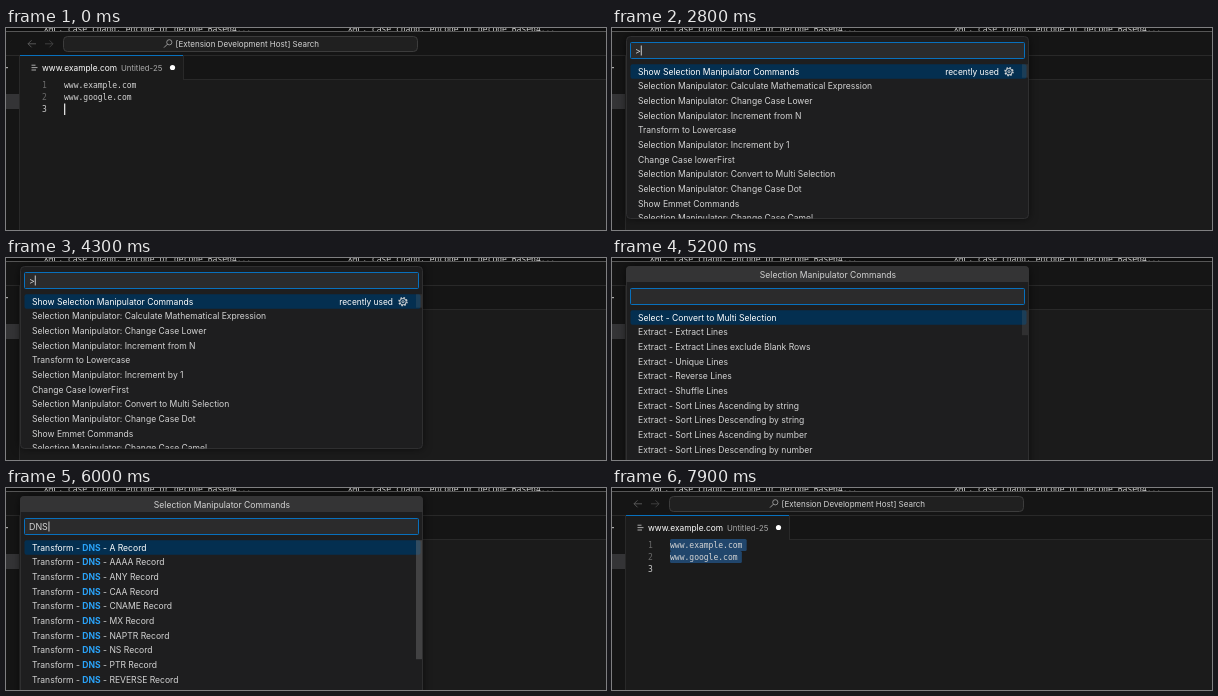
Write an HTML page that moves like this. It is 600x202 px and loops after 8000 ms.

```html
<!DOCTYPE html>
<html lang="en">
<head>
<meta charset="utf-8">
<title>Command palette</title>
<style>
  html, body { margin: 0; width: 600px; height: 202px; overflow: hidden; background: #1b1b1b; }
  svg { display: block; }
  text { font: 8.57px Inter, "Liberation Sans", sans-serif; fill: #d4d4d4; white-space: pre; }
  .mono { font: 8.02px "DejaVu Sans Mono", monospace; }
  .match { fill: #2aa3f8; font-weight: 700; }
</style>
</head>
<body>
<svg id="stage" width="600" height="202" viewBox="0 0 600 202"></svg>
<script>
const LOOP = 8000, ROW = 14.67;
const OPEN = 2800, MENU = 4400, CLOSE = 7200;

const doc = ['www.example.com', 'www.google.com', ''];
const sm = 'Selection Manipulator: ';
const recent = [
  'Show Selection Manipulator Commands', sm + 'Calculate Mathematical Expression',
  sm + 'Change Case Lower', sm + 'Increment from N', 'Transform to Lowercase',
  sm + 'Increment by 1', 'Change Case lowerFirst', sm + 'Convert to Multi Selection',
  sm + 'Change Case Dot', 'Show Emmet Commands', sm + 'Change Case Camel'
];
const commands = [
  'Select - Convert to Multi Selection',
  ...['Extract Lines', 'Extract Lines exclude Blank Rows', 'Unique Lines', 'Reverse Lines',
    'Shuffle Lines', 'Sort Lines Ascending by string', 'Sort Lines Descending by string',
    'Sort Lines Ascending by number', 'Sort Lines Descending by number',
    'Sort Lines Ascending by length'].map(s => 'Extract - ' + s),
  ...'A AAAA ANY CAA CNAME MX NAPTR NS PTR REVERSE SOA'.split(' ')
    .map(s => `Transform - DNS - ${s} Record`)
];

const rect = (x, y, w, h, fill, extra = '') =>
  `<rect x="${x}" y="${y}" width="${w}" height="${h}" fill="${fill}" ${extra}/>`;
const text = (x, y, s, style = '', cls = '') =>
  `<text x="${x}" y="${y}" style="${style}" class="${cls}">${s}</text>`;
const line = (d, color, width = 1) =>
  `<path d="${d}" fill="none" stroke="${color}" stroke-width="${width}"/>`;

// Caret shows for the first half of each second after it was last moved
const blink = (t, since) => (t - since) % 1000 < 500;

function editor(t) {
  // Up twice, then extend the selection down twice
  const selected = t < 2200 ? 0 : t < 2300 ? 1 : 2;
  const active = t < 2000 ? 2 : t < 2100 ? 1 : t < 2200 ? 0 : selected;
  const caret = t < 2000 ? t < 200 || t >= 700 && blink(t, 700)
    : t < OPEN ? true : t >= CLOSE && blink(t, CLOSE);
  const banner = 'XML, case chang, encode or decode Base64...';
  let s = rect(0, 0, 600, 4, '#0c0c0c')
    + text(37.7, 4.2, banner, '', 'mono') + text(341.7, 4.2, banner, '', 'mono')
    + rect(0, 4, 600, 198, '#151515') + rect(0, 3, 600, 1, '#555')
    + rect(0, 27, 600, 1, '#292929')
    + rect(14, 52, 586, 150, '#1b1b1b') + rect(14, 51, 586, 1, '#292929')
    + rect(14, 27, 163, 25, '#1b1b1b') + rect(14, 27, 163, 1, '#0870bd')
    + rect(13, 28, 1, 174, '#292929') + rect(177, 28, 1, 24, '#292929')
    + rect(0, 66, 13, 15, '#343436') + rect(0, 39, 2, 1.2, '#aaa')
    // Title bar
    + line('M30 15.8H22m3.5-3.5L22 15.8l3.5 3.5', '#656565', .8)
    + line('M39 15.8h8m-3.5-3.5l3.5 3.5l-3.5 3.5', '#484848', .8)
    + rect(57.5, 8.5, 354, 15, '#202020', 'rx="4" stroke="#3c3c3c"')
    + '<circle cx="163.3" cy="14.3" r="2.6" fill="none" stroke="#aaa" stroke-width=".8"/>'
    + line('M161.4 16.2L158 19.6', '#aaa', .9)
    + text(169.5, 18.7, '[Extension Development Host] Search', 'font-size:8px')
    // Tab
    + line('M25.5 37.2h4m-4 2.4h6m-6 2.4h4.5', '#b8b8b8', .9)
    + text(36, 42.6, doc[0], 'font-size:8.35px;fill:#fff')
    + text(115, 42.6, 'Untitled-25', 'font-size:7.8px;fill:#aaa')
    + '<circle cx="166.5" cy="39.5" r="2.6" fill="#fff"/>';
  doc.forEach((str, i) => {
    const y = 51 + 12 * i;
    if (i < selected) s += rect(58, y, (str.length + 1) * 4.83 - .6, 12, '#21466c', 'rx="1.5"');
    s += text(36, y + 8.9, i + 1, `fill:${i === active ? '#ccc' : '#6a6a6a'}`, 'mono')
      + text(58, y + 8.9, str, '', 'mono');
  });
  return caret ? s + rect(58, 51.5 + 12 * active, 1.3, 11.5, '#ddd') : s;
}

function palette(t) {
  const menu = t >= MENU, top = menu ? 30 : 14;
  const query = t < 5800 || !menu ? '' : 'DNS'.slice(0, Math.floor((t - 5700) / 100));
  const typed = menu ? query : '&gt;';
  const rows = menu ? commands.filter(c => c.toUpperCase().includes(query)) : recent;
  const since = query ? Math.min(6000, Math.floor(t / 100) * 100) : menu ? MENU : OPEN;
  const caretX = menu ? [23.5, 29.8, 36.5, 42.5][query.length] : 28.8;
  const caretOn = menu ? blink(t, since) : blink(t, OPEN) || t >= 4300;
  const first = top + 22.2;
  let s = rect(14.5, 8.5, 402, menu ? 210 : 182, '#1e1e1f',
      'rx="4" stroke="#2f2f30" style="filter:drop-shadow(0 0 4px #0008)"');
  if (menu) {
    s += line('M14 24V12q0-4 4-4h395q4 0 4 4v12z', 'none').replace('fill="none"', 'fill="#343435"')
      + text(216, 20.2, 'Selection Manipulator Commands', 'text-anchor:middle');
  }
  s += rect(18.5, top + .5, 394, 16, '#2b2b2c', 'rx="1" stroke="#0870bd"')
    + text(23, top + 11.7, typed, 'font-size:8.9px')
    + rect(18.5, first, 396, ROW, '#042f50', 'rx="2"');
  if (caretOn) s += rect(caretX, top + 3.5, .9, 10, '#ddd');

  s += '<g clip-path="url(#inside)">';
  rows.slice(0, 11).forEach((row, i) => {
    const label = query
      ? row.replace(new RegExp(query, 'i'), '<tspan class="match">$&</tspan>') : row;
    s += text(26, first + 10.5 + i * ROW, label, i ? '' : 'fill:#fff');
  });
  s += '</g>';

  // The scrollbar is faint until the list is filtered
  const bar = !menu ? 13.5 : query.length > 1 ? 119 : query ? 70 : 25;
  s += rect(410, first, 6, bar, '#797979', `opacity="${query ? .4 : .2}"`);
  if (!menu) {
    s += text(387, first + 10.5, 'recently used', 'fill:#fff;font-size:8.4px;text-anchor:end')
      + '<g fill="none" stroke="#ddd"><circle cx="397" cy="43.7" r="3.2" stroke-width=".9"/>'
      + '<circle cx="397" cy="43.7" r="4" stroke-width="1.3" stroke-dasharray="1.57 1.57"/>'
      + '<circle cx="397" cy="43.7" r="1.1" stroke-width=".8"/></g>';
  }
  return `<clipPath id="inside">${rect(15, 9, 401, menu ? 193 : 181.5, '#000')}</clipPath>` + s;
}

const stage = document.getElementById('stage');
let shown = '';

function draw() {
  const t = performance.now() % LOOP;
  const picture = editor(t) + (t >= OPEN && t < CLOSE ? palette(t) : '');
  if (picture !== shown) stage.innerHTML = shown = picture;
  requestAnimationFrame(draw);
}
draw();
</script>
</body>
</html>
```
